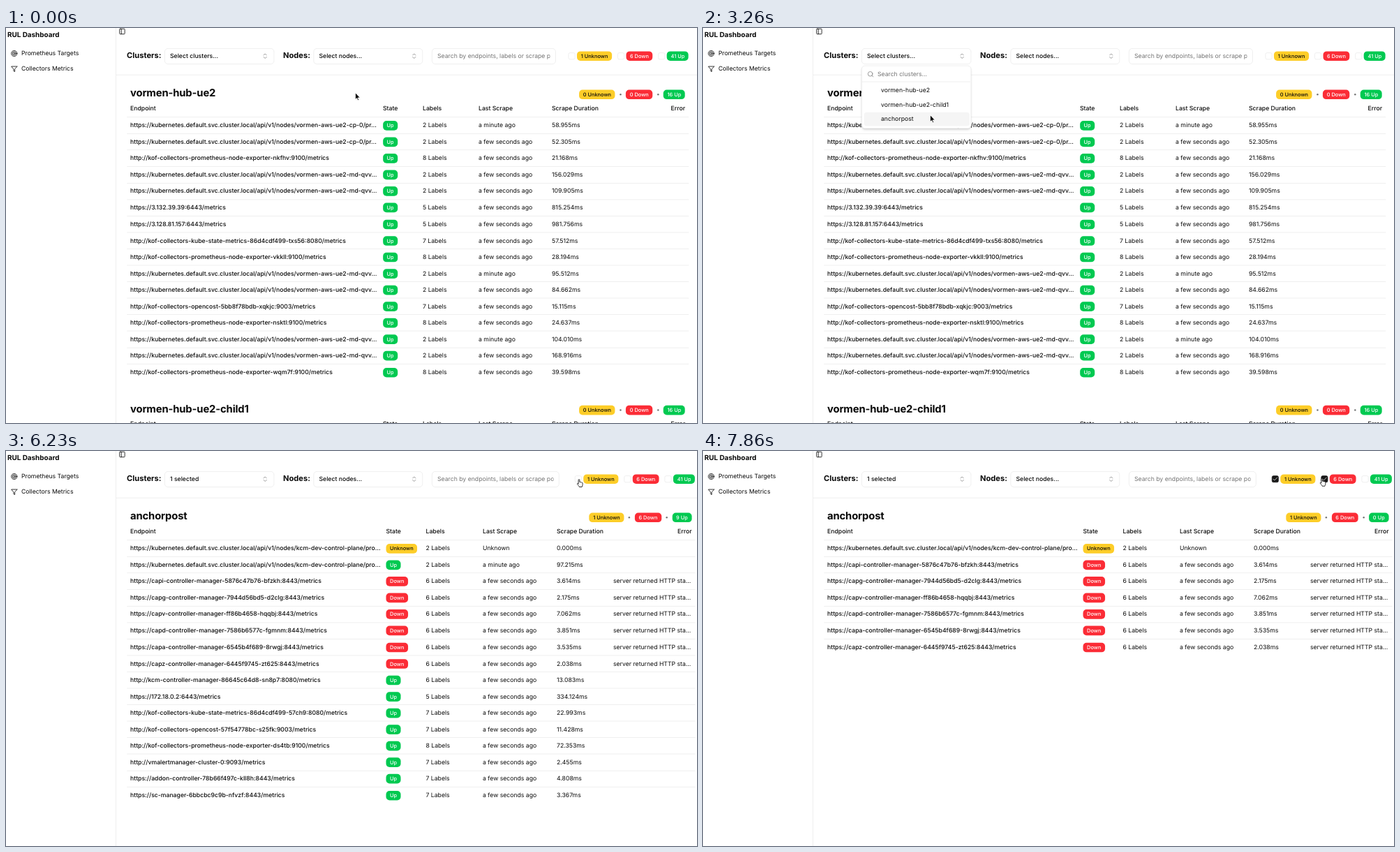
An HTML page for the animation above (8 s loop, 990 by 566 pixels).

```html
<!DOCTYPE html>
<html lang="en">
<head>
<meta charset="utf-8">
<title>Dashboard</title>
<style>
  html, body { margin: 0; width: 100%; height: 100%; overflow: hidden; background: #fff; }
  body { position: relative; font: 400 14px Inter, sans-serif; color: #0a0a0a;
    font-optical-sizing: none; text-rendering: geometricPrecision; }
  #stage { position: absolute; width: 990px; height: 566px; overflow: hidden; }
  #stage * { box-sizing: border-box; }
  #view { position: absolute; left: 0; top: 0; width: 1600px; height: 915px; transform: scale(.61875); transform-origin: 0 0; }
  .t, .line, .box, .badge, .tally, .pick, svg { position: absolute; }
  .t { margin-top: -10px; line-height: 20px; white-space: pre; }
  .m { font-weight: 500; }
  .brand { font-size: 16px; font-weight: 700; }
  .label { font-size: 18px; font-weight: 700; }
  .title { font-size: 24px; font-weight: 700; letter-spacing: -.012em; }
  .muted { color: #737373; }
  .line { background: #e5e5e5; }
  .box { border: 1px solid #e5e5e5; border-radius: 8px; background: #fff; overflow: hidden; }
  .box.hover { background: #f5f5f5; }
  .menu { box-shadow: 0 4px 6px -1px #0002, 0 2px 4px -2px #0002; }
  .hint { position: absolute; left: 12px; right: 12px; top: 0; height: 35px; overflow: hidden; }
  .badge { height: 22px; padding: 0 9px; border-radius: 8px; line-height: 22px; white-space: pre;
    font-size: 12px; font-weight: 500; color: #fff; }
  .Unknown { background: #fdcd28; color: #0a0a0a; }
  .Down { background: #fb2c36; }
  .Up { background: #00c951; }
  .tally { display: flex; align-items: center; height: 22px; margin-top: -11px; }
  .tally .badge { position: static; }
  .tally i { width: 4px; height: 4px; margin: 0 10.5px; border-radius: 50%; background: #737373; }
  .tally b { position: relative; width: 16px; height: 16px; margin: 0 4px 0 13px; border: 1px solid #e5e5e5; border-radius: 4px; }
  .tally b.on { background: #171717; border-color: #171717; }
  svg { fill: none; stroke: #0a0a0a; stroke-width: 2; stroke-linecap: round; stroke-linejoin: round; overflow: visible; }
  .pick { border-radius: 6px; background: #f5f5f5; }
  #cursor { left: 0; top: 0; width: 12px; height: 14px; stroke-width: .8; }
</style>
</head>
<body>
<div id="stage">
  <div id="view"></div>
  <svg id="cursor" viewBox="0 0 12 14">
    <path id="arrow" fill="#000" stroke="#fff" d="M0 0V9.4L2.2 7.4 3.6 10.7 5.1 10.1 3.7 6.9H6.6Z"/>
    <path id="hand" fill="#fff" stroke="#000" d="M-.9 5.6V.6a.9.9 0 0 1 1.8 0V3.6Q1.8 2.9 2.5 3.9 3.4 3.3 3.9 4.3 5.1 4 5.1 5.4V7.2C5.1 8.8 4.3 9.2 4.2 10.5H.3C0 9-1.6 8-2.5 6.4-2.9 5.4-1.8 5-.9 6Z"/>
  </svg>
</div>
<script>
const LOOP = 8000, TICK = 148.15;
const WIDTH = 990, SCALE = 0.61875; // the page is laid out 1600px wide and scaled to the stage
const OPEN = 14, CHOOSE = 23, CLOSE = 31, CHECK_UNKNOWN = 43, CHECK_DOWN = 53;
const CLUSTERS = ['vormen-hub-ue2', 'vormen-hub-ue2-child1', 'anchorpost'];
const STATES = ['Unknown', 'Down', 'Up'];

// Cursor stops: tick, x, y
const PATH = [
  [0, 500.5, 93], [8, 362.5, 41], [10, 362.5, 41], [12, 366, 41], [13, 366, 41],
  [19, 329, 122], [20, 329, 122], [22, 325.5, 125], [25, 325.5, 125], [30, 524.5, 102], [32, 524.5, 102],
  [33, 545, 108], [34, 608, 113], [35, 700, 108], [36, 785, 92], [37, 838, 72], [38, 855, 58],
  [39, 840, 49], [40, 824, 43], [42, 821, 41], [45, 821, 41], [50, 886.8, 39.8], [54, 886.8, 39.8]
];

const ICONS = {
  panel: '<rect x="3" y="3" width="18" height="18" rx="2"/><path d="M9 3v18"/>',
  target: '<circle cx="12" cy="12" r="10"/><circle cx="12" cy="12" r="6"/><circle cx="12" cy="12" r="2"/>',
  funnel: '<path d="M22 3H2l8 9.5V19l4 2v-8.5z"/>',
  chevrons: '<path d="m7 15 5 5 5-5M7 9l5-5 5 5"/>',
  search: '<circle cx="11" cy="11" r="8"/><path d="m21 21-4.3-4.3"/>',
  check: '<path d="M20 6 9 17l-5-5"/>'
};

const NODES = 'https://kubernetes.default.svc.cluster.local/api/v1/nodes/';
const KOF = 'http://kof-collectors-', EXPORTER = KOF + 'prometheus-node-exporter-';
const CP = NODES + 'vormen-aws-ue2-cp-0/pr…', MD = NODES + 'vormen-aws-ue2-md-qvv…';
const PLANE = NODES + 'kcm-dev-control-plane/pro…';
const MINUTE = 'a minute ago', SECONDS = 'a few seconds ago';

// Row: endpoint, state, label count, duration, last scrape
const up = (url, labels, ms, ago = SECONDS) => [url, 'Up', labels, ms, ago];
const down = (name, ms) => [`https://${name}:8443/metrics`, 'Down', 6, ms, SECONDS];

const AWS_ROWS = [
  up(CP, 2, '58.955', MINUTE),
  up(CP, 2, '52.305'),
  up(EXPORTER + 'nkfhv:9100/metrics', 8, '21.168'),
  up(MD, 2, '156.029'),
  up(MD, 2, '109.905'),
  up('https://3.132.39.39:6443/metrics', 5, '815.254'),
  up('https://3.128.81.157:6443/metrics', 5, '981.756'),
  up(KOF + 'kube-state-metrics-86d4cdf499-txs56:8080/metrics', 7, '57.512'),
  up(EXPORTER + 'vkkll:9100/metrics', 8, '28.194'),
  up(MD, 2, '95.512', MINUTE),
  up(MD, 2, '84.662'),
  up(KOF + 'opencost-5bb8f78bdb-xqkjc:9003/metrics', 7, '15.115'),
  up(EXPORTER + 'nsktl:9100/metrics', 8, '24.637'),
  up(MD, 2, '104.010', MINUTE),
  up(MD, 2, '168.916'),
  up(EXPORTER + 'wqm7f:9100/metrics', 8, '39.598')
];
const MAIN_ROWS = [
  [PLANE, 'Unknown', 2, '0.000', 'Unknown'],
  up(PLANE, 2, '97.215', MINUTE),
  down('capi-controller-manager-5876c47b76-bfzkh', '3.614'),
  down('capg-controller-manager-7944d56bd5-d2clg', '2.175'),
  down('capv-controller-manager-ff86b4658-hqqbj', '7.062'),
  down('capd-controller-manager-7586b6577c-fgmnm', '3.851'),
  down('capa-controller-manager-6545b4f689-8rwgj', '3.535'),
  down('capz-controller-manager-6445f9745-zt625', '2.038'),
  up('http://kcm-controller-manager-86645c64d8-sn8p7:8080/metrics', 6, '13.083'),
  up('https://172.18.0.2:6443/metrics', 5, '334.124'),
  up(KOF + 'kube-state-metrics-86d4cdf499-57ch9:8080/metrics', 7, '22.993'),
  up(KOF + 'opencost-57f54778bc-s25fk:9003/metrics', 7, '11.428'),
  up(EXPORTER + 'ds4tb:9100/metrics', 8, '72.353'),
  up('http://vmalertmanager-cluster-0:9093/metrics', 7, '2.455'),
  up('https://addon-controller-78b66f497c-kll8h:8443/metrics', 7, '4.808'),
  up('https://sc-manager-6bbcbc9c9b-nfvzf:8443/metrics', 7, '3.367')
];

// Helpers take stage coordinates; cy is the vertical centre
const px = v => (v / SCALE).toFixed(2) + 'px';
const text = (x, cy, str, cls = '') => `<span class="t ${cls}" style="left:${px(x)};top:${px(cy)}">${str}</span>`;
const textEnd = (x, cy, str, cls = '') => `<span class="t ${cls}" style="right:${px(WIDTH - x)};top:${px(cy)}">${str}</span>`;
const rect = (cls, x, y, w, h, inner = '') =>
  `<div class="${cls}" style="left:${px(x)};top:${px(y)};width:${px(w)};height:${px(h)}">${inner}</div>`;
const rule = (x, y, w) => rect('line', x, y, w, SCALE);
const icon = (name, cx, cy, style = '', size = 9.9) =>
  `<svg viewBox="0 0 24 24" style="left:${px(cx - size / 2)};top:${px(cy - size / 2)};width:${px(size)};height:${px(size)};${style}">${ICONS[name]}</svg>`;
const badge = (state, str, style = '') => `<span class="badge ${state}" style="${style}">${str}</span>`;
const tally = (right, cy, inner) => `<div class="tally" style="right:${px(WIDTH - right)};top:${px(cy)}">${inner}</div>`;

const select = (x, w, str, hover) =>
  rect('box' + (hover ? ' hover' : ''), x, 29, w, 23) + text(x + 8, 40.5, str, 'm') + icon('chevrons', x + 144, 40.5, 'opacity:.5');

function sidebar() {
  return text(2, 9, 'RUL Dashboard', 'brand') +
    icon('target', 12, 36.5) + text(22, 36.5, 'Prometheus Targets') +
    icon('funnel', 12, 59) + text(22, 59, 'Collectors Metrics') +
    rect('line', 157.2, 0, SCALE, 566) + icon('panel', 166.7, 5);
}

function toolbar(s) {
  const filters = STATES.map((state, i) => {
    const on = s.checked.includes(state);
    const mark = on ? icon('check', 4.33, 4.33, 'stroke:#fff', 8.66) : '';
    return `<b class="${on ? 'on' : ''}">${mark}</b>` + badge(state, [1, 6, 41][i] + ' ' + state);
  }).join('');
  const hint = `<div class="hint">${text(0, 10.9, 'Search by endpoints, labels or scrape pool', 'muted')}</div>`;
  return text(173, 40.5, 'Clusters:', 'label') + select(227, 157, s.chosen ? '1 selected' : 'Select clusters...', s.hover) +
    text(397, 40.5, 'Nodes:', 'label') + select(440.5, 156.5, 'Select nodes...') +
    rect('box', 610, 29, s.chosen ? 182.5 : 177.5, 23, hint) +
    tally(s.chosen ? 987.2 : 977.9, 40.5, filters) + rule(158, 67, 832);
}

function section(name, rows, y, wide) {
  const [stateX, labelX, scrapeX, timeX, end] = wide ? [544.5, 601.5, 683, 789, 987.5] : [540, 597, 677, 782, 978];
  const counts = STATES.map(s => badge(s, rows.filter(r => r[1] === s).length + ' ' + s)).join('<i></i>');
  const headY = y + 22.3;
  const head = text(178, y, name, 'title') + tally(end - 5.2, y + 2, counts) +
    text(178, headY, 'Endpoint', 'm') + text(stateX, headY, 'State', 'm') + text(labelX, headY, 'Labels', 'm') +
    text(scrapeX, headY, 'Last Scrape', 'm') + text(timeX, headY, 'Scrape Duration', 'm') +
    textEnd(end - 5, headY, 'Error', 'm');
  return head + rows.map(([url, state, labels, ms, ago], i) => {
    const cy = y + 46.8 + i * 23.58;
    return rule(173, cy - 12.3, end - 173) + text(178, cy, url, 'm') +
      badge(state, state, `left:${px(stateX)};top:${px(cy - 6.8)}`) +
      text(labelX, cy, labels + ' Labels') + text(scrapeX, cy, ago) + text(timeX, cy, ms + 'ms') +
      (state === 'Down' ? text(870, cy, 'server returned HTTP sta…') : '');
  }).join('');
}

function menu(s) {
  const options = CLUSTERS.map((name, i) => text(255, 90 + i * 20.2, name)).join('');
  return rect('box menu', 227, 54, 157, 90) + icon('search', 240, 66, 'opacity:.5') +
    text(250, 66, 'Search clusters...', 'muted') + rule(228, 77, 155) +
    rect('pick', 230.5, 80 + s.pick * 20.2, 151, 20.3) + options +
    (s.chosen ? icon('check', 241, 130.4) : '');
}

function page(s) {
  const shown = MAIN_ROWS.filter(r => !s.checked.length || s.checked.includes(r[1]));
  const body = s.chosen
    ? section(CLUSTERS[2], shown, 93, true)
    : section(CLUSTERS[0], AWS_ROWS, 93) + section(CLUSTERS[1], AWS_ROWS, 545.5);
  return sidebar() + body + toolbar(s) + (s.open ? menu(s) : '');
}

function cursorAt(tick) {
  const i = Math.max(1, PATH.findIndex(p => p[0] >= tick));
  const [t0, x0, y0] = PATH[i - 1], [t1, x1, y1] = PATH[i];
  const u = (tick - t0) / (t1 - t0), e = u * u * (3 - 2 * u);
  return [x0 + (x1 - x0) * e, y0 + (y1 - y0) * e];
}

const $ = id => document.getElementById(id);
const start = performance.now();
let lastTick = -1, lastKey = '';

function draw() {
  const time = (performance.now() - start) % LOOP;
  const tick = Math.min(53, Math.floor((time + 4) / TICK));
  if (tick !== lastTick) {
    lastTick = tick;
    const [x, y] = cursorAt(tick);
    const open = tick >= OPEN && tick < CLOSE;
    const overSelect = x < 384 && y < 52;
    const overCheck = y < 46 && (Math.abs(x - 820) < 6 || Math.abs(x - 888) < 6);
    const state = {
      open,
      hover: overSelect && !open,
      pick: !open ? 0 : tick > 19 ? 2 : y < 100 ? 0 : y < 120 ? 1 : 2,
      chosen: tick >= CHOOSE,
      checked: [...(tick >= CHECK_UNKNOWN ? ['Unknown'] : []), ...(tick >= CHECK_DOWN ? ['Down'] : [])]
    };
    const key = JSON.stringify(state);
    if (key !== lastKey) $('view').innerHTML = page(state);
    lastKey = key;
    const hand = overSelect || overCheck;
    $('hand').style.display = hand ? '' : 'none';
    $('arrow').style.display = hand ? 'none' : '';
    $('cursor').style.transform = `translate(${x}px,${y}px)`;
  }
  requestAnimationFrame(draw);
}
draw();
</script>
</body>
</html>
```
